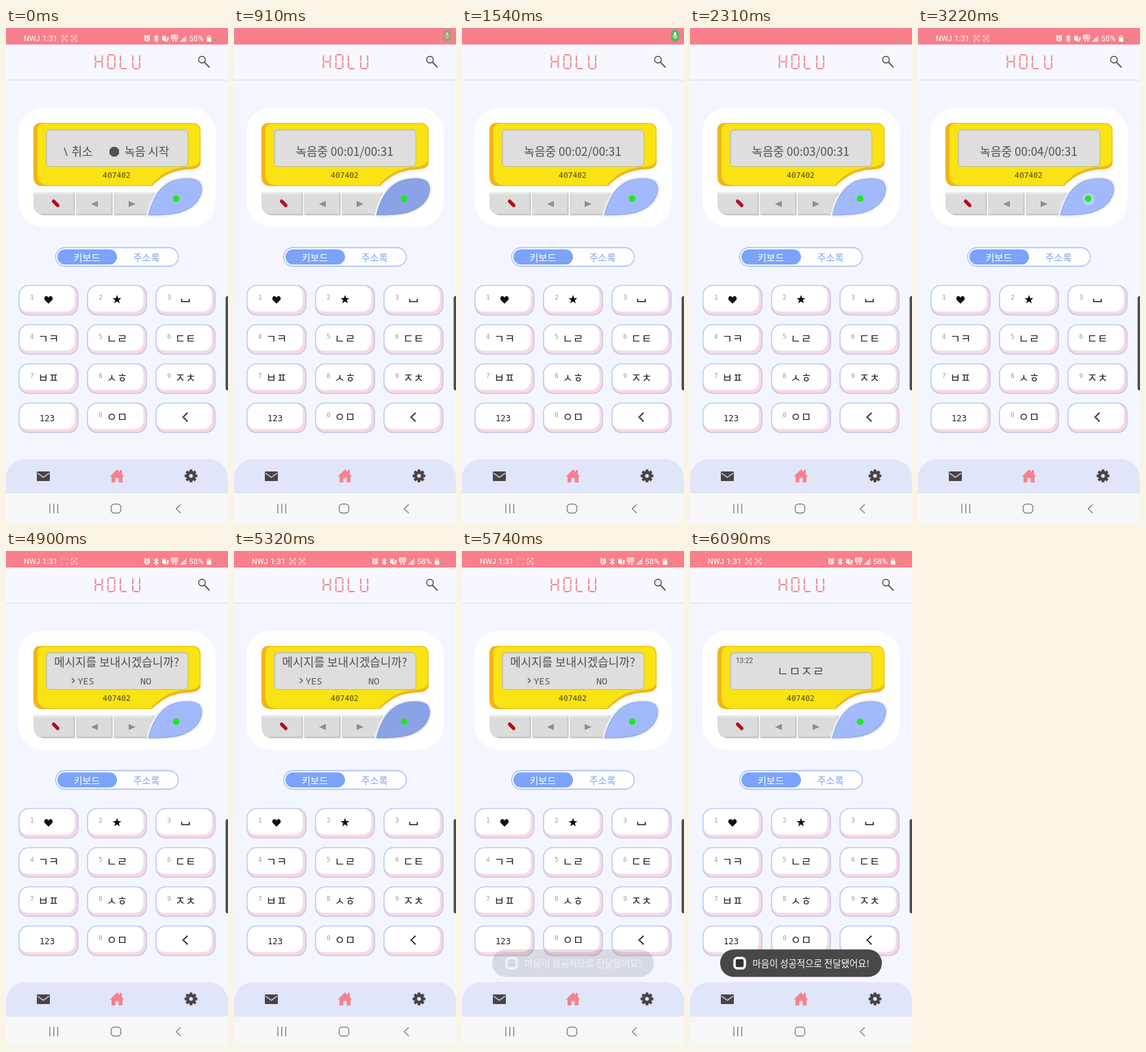
Recreate the animation shown at these times as an HTML page with a canvas. Size 324x720 px, loop 6.3 s.

```html
<!DOCTYPE html>
<html lang="ko">
<head>
<meta charset="utf-8">
<title>Pager</title>
<style>
html, body { margin: 0; width: 100%; height: 100%; overflow: hidden; background: #f4f6ff; }
canvas { display: block; width: 324px; height: 720px; }
</style>
</head>
<body>
<canvas id="stage" width="324" height="720"></canvas>
<script>
const ctx = document.getElementById('stage').getContext('2d');
const LOOP = 6300;
const KO = '"Noto Sans CJK KR", "Noto Sans CJK", sans-serif';
const MONO = '"DejaVu Sans Mono", monospace';
const PINK = '#f8808c', INK = '#4a4446', BLUE = '#7ba3fa';

const clamp = v => Math.max(0, Math.min(1, v));
const ease = v => 1 - (1 - clamp(v)) ** 2;

function box(x, y, w, h, r, fill, stroke, width = 1) {
  ctx.beginPath();
  ctx.roundRect(x, y, w, h, r);
  paint(fill, stroke, width);
}

function shape(d, fill, stroke, width = 1) {
  const path = new Path2D(d);
  if (fill) { ctx.fillStyle = fill; ctx.fill(path); }
  if (stroke) { ctx.strokeStyle = stroke; ctx.lineWidth = width; ctx.stroke(path); }
}

function disc(x, y, r, fill, stroke, width) {
  ctx.beginPath();
  ctx.arc(x, y, r, 0, Math.PI * 2);
  paint(fill, stroke, width);
}

function paint(fill, stroke, width) {
  if (fill) { ctx.fillStyle = fill; ctx.fill(); }
  if (stroke) { ctx.strokeStyle = stroke; ctx.lineWidth = width; ctx.stroke(); }
}

function text(s, x, y, size, color, family = KO, align = 'center', weight = 400) {
  ctx.font = `${weight} ${size}px ${family}`;
  ctx.textAlign = align;
  ctx.textBaseline = 'alphabetic';
  ctx.fillStyle = color;
  ctx.fillText(s, x, y);
}

function scanIcon(x, dim, ring) {
  const c = dim ? 'rgba(255,255,255,.6)' : 'rgba(255,255,255,.85)';
  const arm = dim ? 1.2 : 2.6;
  for (const sx of [-1, 1]) for (const sy of [-1, 1]) {
    const cx = x + sx * 4, cy = 15 + sy * 4;
    shape(`M${cx - sx * arm},${cy}H${cx}V${cy - sy * arm}`, null, c, 1);
  }
  if (ring) disc(x, 15, ring, null, c, 1);
}

function statusBar(t) {
  ctx.fillStyle = '#f87f8b';
  ctx.fillRect(0, 0, 324, 24);
  const hidden = t >= 630 && t < 2450;
  if (!hidden) {
    const dim = t >= 280 && Math.floor(t / 350) % 2 === 0;
    text('NWJ', 26, 19, 11, '#fff', 'Roboto, sans-serif', 'left');
    text('1:31', 53, 19, 11.5, '#fff', 'Roboto, sans-serif', 'left');
    scanIcon(85.5, dim, dim ? 0 : 1.8);
    scanIcon(99.5, false, dim ? 1.1 : 1.8);
    disc(206, 15.5, 3.2, null, '#fff', 1.6);
    shape('M202 12L204 10.5M210 12L208 10.5M206 13V16H208', null, '#fff', 1.3);
    shape('M216 12.5L222 17.5L219 20V11L222 13.5L216 18.5', null, '#fff', 1.1);
    shape('M228 13H230L233 10.5V20.5L230 18H228Z', '#fff');
    shape('M234.5 13L237.5 18M237.5 13L234.5 18M228 11L236 20', null, '#fff', 1.1);
    box(241.5, 10.5, 9, 5, 1, null, '#fff', 1.3);
    shape('M243 13H249M244 17V20M248 20V17', null, '#fff', 1.4);
    for (let i = 0; i < 4; i++) {
      ctx.fillStyle = i < 3 ? '#fff' : 'rgba(255,255,255,.6)';
      ctx.fillRect(255 + i * 2.3, 18 - i * 2.4, 1.5, 2 + i * 2.4);
    }
    text('58%', 267, 19, 11.5, '#fff', 'Roboto, sans-serif', 'left');
    box(293, 14, 6.5, 6, 1, '#fff');
    box(294.5, 11, 3.5, 5, 1.5, null, '#fff', 1.1);
  }
  if (t >= 770 && t < 2310) micPill(t);
  else disc(305, 18, 1.6, '#4bd04b');
}

function micPill(t) {
  const shrink = ease((t - 2100) / 210);
  const size = 1 - shrink * .8;
  ctx.save();
  ctx.globalAlpha = t < 2100 ? .25 + .75 * clamp((t - 840) / 210) : 1;
  ctx.translate(311 - 6 * shrink, 11 + 7 * shrink);
  ctx.scale(size, size);
  box(-6, -9, 12, 18, 6, '#5bb56c');
  box(-1.5, -5, 3, 6, 1.5, '#fff');
  shape('M-3 0Q-3 3 0 3Q3 3 3 0M0 3V5', null, '#fff', 1);
  ctx.restore();
}

// Segment order: top, upper right, lower right, bottom, lower left, upper left, middle.
const SEGMENTS = [[1, 0, 9, 0], [10, 1, 10, 9.3], [10, 10.7, 10, 19], [1, 20, 9, 20],
  [0, 10.7, 0, 19], [0, 1, 0, 9.3], [1, 10, 9, 10]];
const LETTERS = { H: [1, 2, 4, 5, 6], O: [0, 1, 2, 3, 4, 5], L: [3, 4, 5], U: [1, 2, 3, 4, 5] };

function header() {
  ctx.fillStyle = '#f7f8ff';
  ctx.fillRect(0, 24, 324, 51);
  ctx.fillStyle = '#e2e4ef';
  ctx.fillRect(0, 75, 324, 1.5);
  [...'HOLU'].forEach((letter, i) => {
    const x = 130.5 + i * 18.2;
    for (const s of LETTERS[letter]) {
      const [x1, y1, x2, y2] = SEGMENTS[s];
      shape(`M${x + x1},${39 + y1}L${x + x2},${39 + y2}`, null, '#f58a91', 2);
    }
  });
  disc(286, 46, 4.8, null, INK, 1.4);
  shape('M289.5 49.5L297 57.5', null, INK, 1.8);
}

const LEAF = 'M208 272C213 251 222 232 242 223C258 217 276 218 282 224C290 233 284 250 272 259C258 270 241 272 208 272Z';

function pager() {
  box(18, 116, 288, 173, 36, '#fff');
  shape('M40 149Q40 138 51 138H272Q284 138 284 150V195Q284 206 264 206C238 208 226 218 213 230H54Q40 230 40 216Z', '#f2b41a');
  shape('M46 149Q46 139 56 139H272Q283 139 283 150V191Q283 201 264 202C236 204 223 216 211 229H62Q46 228 46 212Z', '#f9e314', '#eed416', 1);
  box(58.5, 147.5, 207, 54, 6, '#dedede', '#bdb98c', 1);
  shape('M60 198V153Q60 149 64 149H262', null, '#c9c9c7', 1);
  text('407402', 161.5, 218, 11.3, '#4d431d', MONO);

  const keys = ['M41 240H100V272H55Q41 271 41 255Z', 'M103 240H155V272H103Z', 'M158 240H217L207 272H158Z'];
  for (const k of keys) shape(k, '#dcdcdc', '#cbcbcb', 1);
  shape('M42 241H98M104 241H153M159 241H214', null, '#efefef', 1.5);
  shape('M51 271H99M104 271H154M159 271H206M99.5 242V271M154.5 242V271', null, '#c0c0c0', 1.5);
  ctx.lineCap = 'round';
  shape('M69.5 252L75.5 258', null, '#811', 5);
  shape('M69.5 252L75.5 258', null, '#cc0010', 3.8);
  ctx.lineCap = 'butt';
  shape('M124 256L134 251.5V260.5Z', '#8e8e8e');
  shape('M189 256L179 251.5V260.5Z', '#8e8e8e');
}

function leafButton(t) {
  shape(LEAF, '#a2b9fb', '#f1f1f5', 6);
  shape(LEAF, '#a2b9fb', '#90a7ea', 1.1);
  for (const [start, length] of [[490, 560], [3150, 350], [5040, 560]]) ripple((t - start) / length);
  disc(248.3, 248.3, 4.7, '#17ec17');
}

function ripple(p) {
  if (p < 0 || p >= 1) return;
  ctx.save();
  ctx.clip(new Path2D(LEAF));
  if (p < .25) {
    disc(249, 249, 6 + p * 15, 'rgba(225,231,246,.4)');
  } else {
    const alpha = .24 * clamp((1 - p) / .2);
    disc(249, 249, 9 + 50 * ease((p - .25) / .35), `rgba(65,90,165,${alpha})`);
  }
  ctx.restore();
}

function display(t) {
  const c = '#505050';
  if (t < 560) {
    shape('M85 174L89 186', null, c, 1.3);
    text('취소', 111, 186, 16.7, c);
    shape('M155 173H161L165 177V183L161 187H155L151 183V177Z', c);
    text('녹음 시작', 205.5, 186, 16.7, c);
  } else if (t < 3360) {
    const seconds = Math.max(0, Math.floor((t - 70) / 700));
    text(`녹음중 00:0${seconds}/00:31`, 161.5, 186, 17, c);
  } else if (t < 5950) {
    text('메시지를 보내시겠습니까?', 161.5, 168, 16.9, c);
    shape('M96 185L100 188.5L96 192', null, c, 1.2);
    text('YES', 116.5, 193.5, 13.4, c, '"Noto Sans Mono", monospace');
    text('NO', 204, 193.5, 13.4, c, '"Noto Sans Mono", monospace');
  } else {
    text('13:22', 67, 163, 10, c, 'Roboto, sans-serif', 'left');
    text('ㄴㅁㅈㄹ', 161.5, 182, 18.8, c);
  }
}

function toggle() {
  box(72.5, 319.5, 179, 27, 13.5, '#fff', '#a3bcf5', 1.3);
  box(75, 322, 87, 22, 11, BLUE);
  text('키보드', 118, 338.5, 14, '#fff');
  text('주소록', 205, 338.5, 14, BLUE);
}

const KEYS = [['1', 'heart'], ['2', 'star'], ['3', 'space'],
  ['4', 'ㄱㅋ'], ['5', 'ㄴㄹ'], ['6', 'ㄷㅌ'],
  ['7', 'ㅂㅍ'], ['8', 'ㅅㅎ'], ['9', 'ㅈㅊ'],
  ['', '123'], ['0', 'ㅇㅁ'], ['', 'back']];

const GLYPHS = {
  heart: () => shape('M0 6L-6 0V-3L-4 -5H-2L0 -3L2 -5H4L6 -3V0Z', '#111'),
  star: () => {
    ctx.beginPath();
    for (let i = 0; i < 10; i++) {
      const a = i * Math.PI / 5, r = i % 2 ? 2.8 : 6.8;
      ctx.lineTo(Math.sin(a) * r, -Math.cos(a) * r);
    }
    paint('#111');
  },
  space: () => shape('M-5.5 -1V3H5.5V-1', null, '#222', 1.6),
  back: () => {
    ctx.fillStyle = '#111';
    for (let i = -3; i <= 3; i++) ctx.fillRect(-4.5 + Math.abs(i) * 1.8, i * 1.8 - 1, 2.2, 2);
  }
};

function keypad() {
  KEYS.forEach(([digit, label], i) => {
    const x = 19 + i % 3 * 100, y = 374.5 + Math.floor(i / 3) * 57;
    box(x, y, 86, 43, 14, '#fbd6e0');
    box(x, y, 81.5, 38, 13, '#fff');
    box(x, y, 86, 43, 14, null, '#bccbf1', 1.6);
    text(digit, x + 19, y + 20, 9, '#999', MONO);
    if (GLYPHS[label]) {
      ctx.save();
      ctx.translate(x + 43, y + 20.5);
      GLYPHS[label]();
      ctx.restore();
    } else if (label === '123') {
      text(label, x + 41, y + 26, 12.2, '#222', MONO);
    } else {
      text(label, x + 43, y + 26.5, 16.5, '#222', KO, 'center', 500);
    }
  });
}

function gear(x, y) {
  ctx.save();
  ctx.translate(x, y);
  ctx.fillStyle = INK;
  for (let i = 0; i < 8; i++) {
    ctx.fillRect(-2, -9.3, 4, 5);
    ctx.rotate(Math.PI / 4);
  }
  disc(0, 0, 5, null, INK, 4.5);
  ctx.restore();
}

function navigation() {
  box(0, 627, 324, 50, [28, 28, 0, 0], '#e0e5f9');
  box(45, 645, 19, 14, 1, INK);
  shape('M46 647.5L54.5 653.5L63 647.5', null, '#e0e5f9', 1.2);
  shape('M151.5 652.5L162 642L166 646V643H169V649L172.5 652.5H170V661H164.5V654.5H159.5V661H154V652.5Z', PINK);
  gear(270, 651.5);
  ctx.fillStyle = '#f7f7f8';
  ctx.fillRect(0, 677, 324, 43);
  shape('M64 692V706M69.7 692V706M75.5 692V706', null, '#858585', 1.4);
  box(153.5, 692.5, 14, 13, 4.5, null, '#858585', 1.5);
  shape('M255 693L248.5 699.3L255 705.5', null, '#858585', 1.5);
  box(320.5, 390, 6, 137, 3, '#4b4b52');
}

function toast(t) {
  if (t < 5740) return;
  const shown = (t - 5740) / 280;
  ctx.save();
  ctx.globalAlpha = clamp(.16 + shown);
  box(44, 579.5, 236, 40, 20, '#484848');
  ctx.globalAlpha = clamp(.65 + shown);
  box(65, 592, 15, 15, 4, shown < .2 ? null : '#302f36', '#fff', 3.5);
  text('마음이 성공적으로 전달됐어요!', 176.5, 604.5, 13.4, '#fff');
  ctx.restore();
}

function render(now) {
  const t = now % LOOP;
  ctx.fillStyle = '#f4f6ff';
  ctx.fillRect(0, 0, 324, 720);
  statusBar(t);
  header();
  pager();
  leafButton(t);
  display(t);
  toggle();
  keypad();
  navigation();
  toast(t);
}

const start = performance.now();
function frame() {
  render(performance.now() - start);
  requestAnimationFrame(frame);
}
frame();
</script>
</body>
</html>
```
